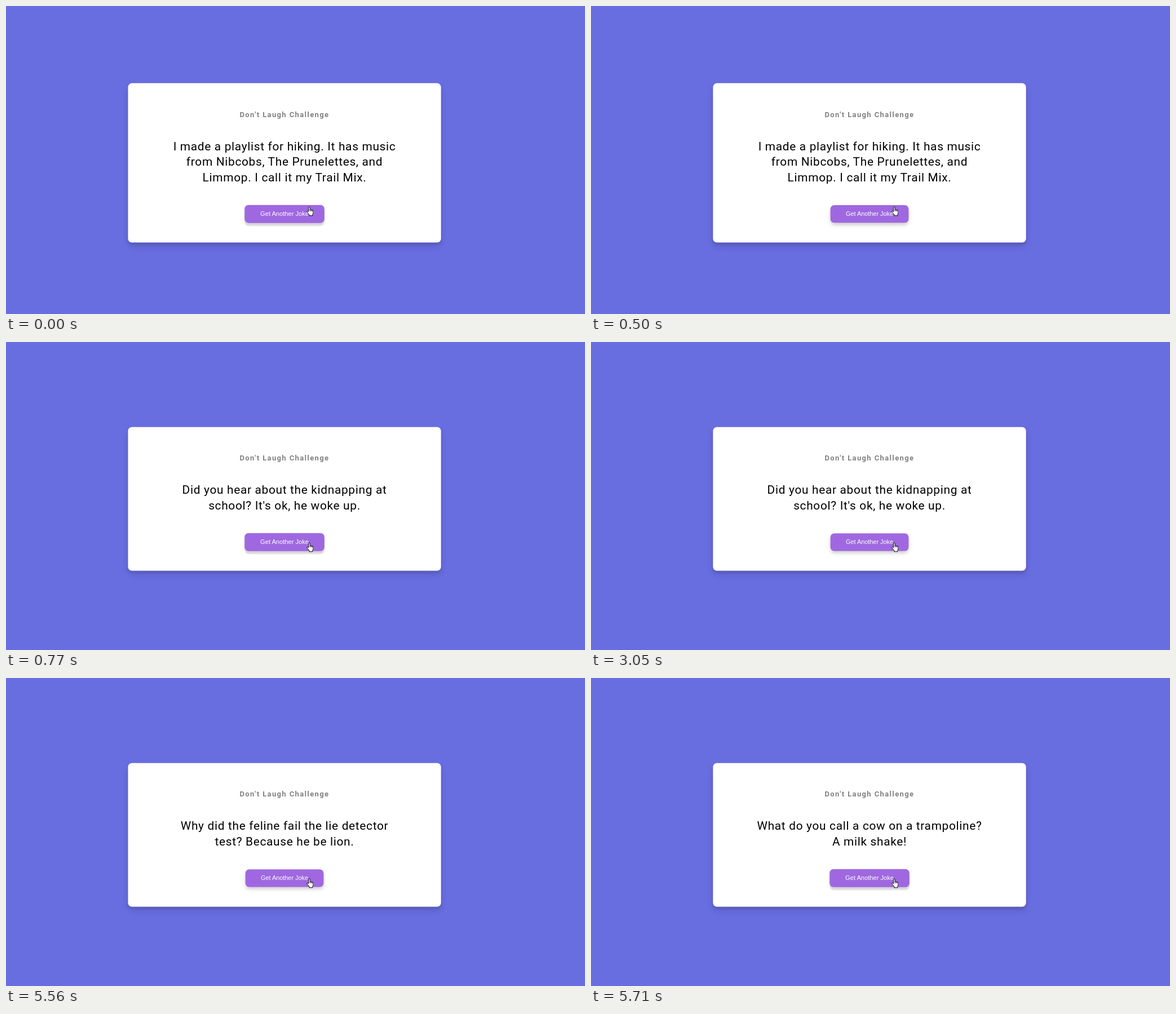
These frames come from a looping animation (1027 by 546 pixels, 8000 ms). An HTML page:

```html
<!DOCTYPE html>
<html lang="en">
<head>
<meta charset="utf-8">
<title>Don't Laugh Challenge</title>
<style>
  html, body { margin: 0; width: 100%; height: 100%; overflow: hidden; }
  body { position: relative; background: #686de0; font-family: Roboto, sans-serif; }
  .card {
    position: absolute; left: 493.6px; top: 278px;
    box-sizing: border-box; width: 800px; padding: 50px 20px;
    transform: translate(-50%, -50%) scale(.694);
    background: #fff; border-radius: 10px; text-align: center;
    box-shadow: 0 10px 20px rgba(0, 0, 0, .1), 0 6px 6px rgba(0, 0, 0, .1);
  }
  h3 {
    margin: 18.72px 0 50px; font-size: 18.72px; line-height: 22px;
    letter-spacing: 2px; color: #808080;
  }
  .joke {
    margin: 0 0 50px; font-size: 30px; line-height: 40px;
    letter-spacing: 1px; white-space: pre; color: #000;
  }
  .button {
    width: 204px; height: 46px; margin: 0 auto; border-radius: 10px;
    background: #9f68e0; color: #fff; white-space: nowrap;
    font: 16px/46px "Liberation Sans", Arial, sans-serif;
    box-shadow: 0 7px 3px rgba(0, 0, 0, .14), 0 5px 15px rgba(0, 0, 0, .03);
  }
  .button.soft { box-shadow: 0 5px 15px rgba(0, 0, 0, .1), 0 6px 6px rgba(0, 0, 0, .1); }
  .button.pressed { transform: scale(.98); }
  .cursor { position: absolute; left: 532.6px; top: 355.2px; width: 12.5px; height: 17.4px; }
</style>
</head>
<body>
<div class="card">
  <h3>Don't Laugh Challenge</h3>
  <div class="joke"></div>
  <div class="button">Get Another Joke</div>
</div>
<svg class="cursor" viewBox="0 0 18 25">
  <path d="M5.3 14V3a1.8 1.8 0 0 1 3.6 0V8.6q1.8-1.2 3 .6 1.7-.9 2.6.8 2.3-.5 2.5 2V17q0 2.2-1.6 4V24H7.2V21.6L1.4 14.6q-1-2 .9-2.5 1.4 0 3 1.9Z"
    fill="#fff" stroke="#000" stroke-width="1.4" stroke-linejoin="round"/>
  <path d="M8.9 8.6V13M11.9 9.2V13M14.5 10V13" fill="none" stroke="#000" stroke-width="1.2"/>
</svg>
<script>
  const LOOP = 8000;
  const jokes = [
    "I made a playlist for hiking. It has music\nfrom Nibcobs, The Prunelettes, and\nLimmop. I call it my Trail Mix.",
    "Did you hear about the kidnapping at\nschool? It's ok, he woke up.",
    "Why did the feline fail the lie detector\ntest? Because he be lion.",
    "What do you call a cow on a trampoline?\nA milk shake!"
  ];
  // [start in ms, joke, button state]
  const steps = [
    [0, 0, ""], [500, 0, "soft pressed"], [620, 0, "soft"],
    [770, 1, ""], [3050, 1, "soft pressed"],
    [3200, 2, ""], [5560, 2, "soft pressed"],
    [5710, 3, ""]
  ];
  const joke = document.querySelector(".joke");
  const button = document.querySelector(".button");
  const start = performance.now();
  let current;

  function draw() {
    const time = Math.max(0, performance.now() - start) % LOOP;
    const step = steps.findLast(([from]) => from <= time);
    if (step !== current) {
      current = step;
      joke.textContent = jokes[step[1]];
      button.className = "button " + step[2];
    }
    requestAnimationFrame(draw);
  }
  draw();
</script>
</body>
</html>
```
